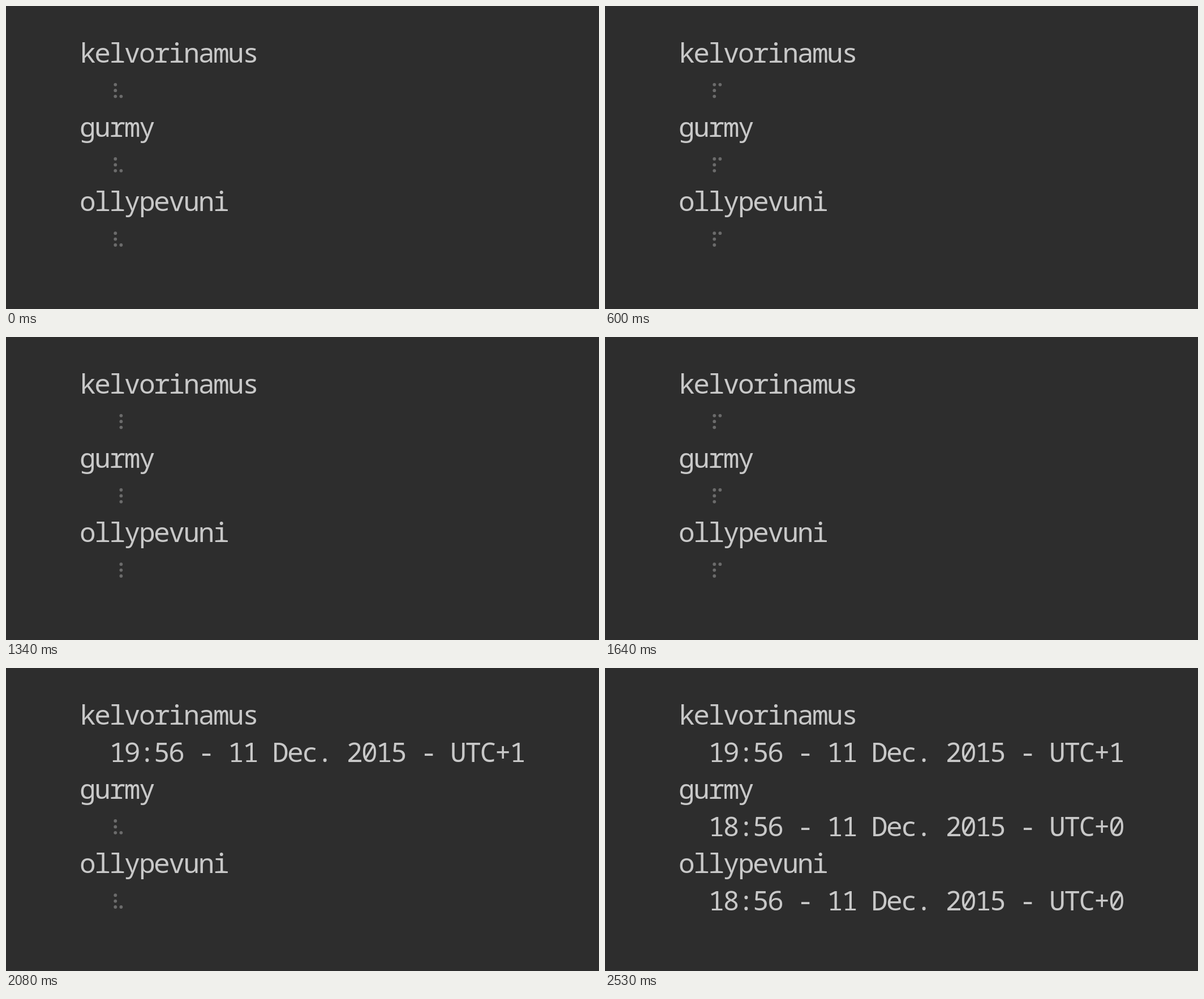
An HTML page that plays this animation: 1048x535 px, repeating every 8 s.

```html
<!DOCTYPE html>
<html lang="en">
<head>
<meta charset="utf-8">
<title>Time lookup</title>
<style>
  html, body { margin: 0; width: 100%; height: 100%; overflow: hidden; background: #2d2d2d; }
  svg { display: block; width: 1048px; height: 535px; }
  text { font: 48px "Noto Sans Mono", "DejaVu Sans Mono", monospace; letter-spacing: -2.6px; fill: #c8c8c8; }
  circle { fill: #6b6b6b; }
</style>
</head>
<body>
<svg id="stage" viewBox="0 0 1048 535"></svg>
<script>
const LOOP = 8000;
const LAST = 17;
const LEFT = 130.1, CELL = 26.2, LINE = 65.6, BASE = 100;
const SPINNER = "⠋⠙⠹⠸⠼⠴⠦⠧⠇⠏";
const stage = document.getElementById("stage");

const users = [
  { name: "kelvorinamus", time: "19:56 - 11 Dec. 2015 - UTC+1", ready: 14 },
  { name: "gurmy", time: "18:56 - 11 Dec. 2015 - UTC+0", ready: 17 },
  { name: "ollypevuni", time: "18:56 - 11 Dec. 2015 - UTC+0", ready: 15 }
];

function add(tag, attrs, content = "") {
  const el = document.createElementNS("http://www.w3.org/2000/svg", tag);
  for (const key in attrs) el.setAttribute(key, attrs[key]);
  el.textContent = content;
  stage.append(el);
  return el;
}

function show(el, on) {
  el.style.visibility = on ? "visible" : "hidden";
}

users.forEach((user, i) => {
  const y = BASE + 2 * i * LINE;
  add("text", { x: LEFT, y }, user.name);
  user.label = add("text", { x: LEFT + 2 * CELL, y: y + LINE }, user.time);
  // Braille dots 1-3 fill the left column, 4-6 the right one.
  user.dots = Array.from({ length: 6 }, (_, d) => add("circle", {
    cx: d < 3 ? 193.3 : 203.4,
    cy: y + 38.8 + (d % 3) * 10.4,
    r: 2.9
  }));
});

// Screen refreshes fall on a 10 ms clock.
function stepAt(t) {
  let k = 0;
  while (k < LAST && t >= Math.round((k + 1) * 14.875) * 10) k++;
  return k;
}

function draw(t) {
  const k = stepAt(t);
  // The spinner turns slightly slower than three glyphs per refresh.
  const turn = 7 + 3 * k - Math.floor((k + 3) / 8);
  const mask = SPINNER.charCodeAt(turn % SPINNER.length) - 0x2800;
  for (const user of users) {
    const done = k >= user.ready;
    show(user.label, done);
    user.dots.forEach((dot, d) => show(dot, !done && mask >> d & 1));
  }
}

const start = performance.now();
function tick() {
  draw((performance.now() - start) % LOOP);
  requestAnimationFrame(tick);
}
tick();
</script>
</body>
</html>
```
